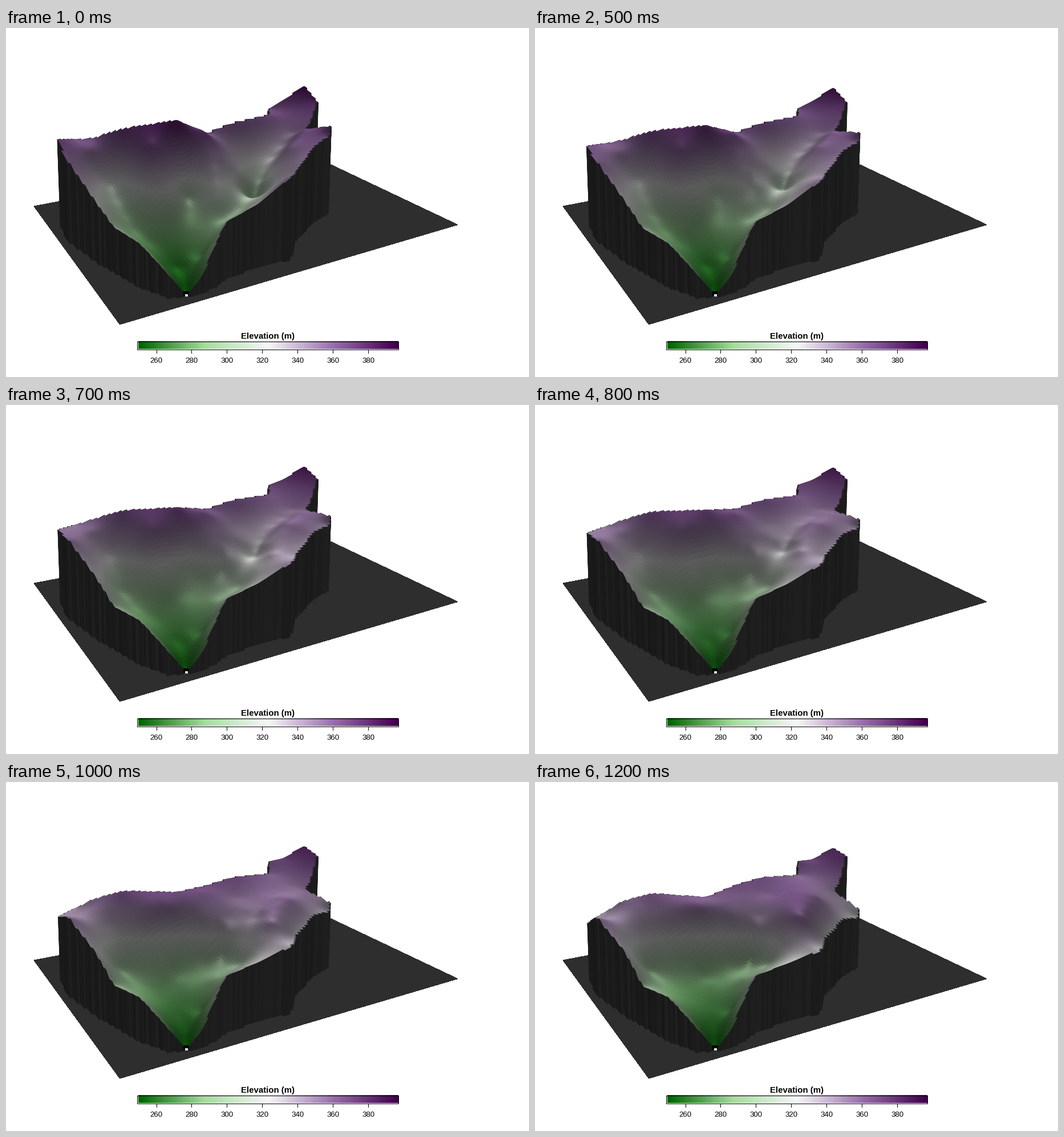
Write a matplotlib script that moves like this. It is 917x611 px and loops after 1.7 s.

```python
import numpy as np
import matplotlib.pyplot as plt
from matplotlib.animation import FuncAnimation
from matplotlib.collections import PolyCollection
from matplotlib.colors import LinearSegmentedColormap
from matplotlib.patches import Polygon, Rectangle
from matplotlib.path import Path

WIDTH, HEIGHT, DPI = 917, 611, 64
PT = 72 / DPI
NU, NV = 150, 86
ASPECT = 1.75
LOW, HIGH = 250, 397
HOLD, STEPS, FRAMES = 3, 9, 17

# Base plate corners on screen and the vanishing point of the verticals
PLATE = np.array([(199.5, 519), (792, 344.5), (531, 221), (49, 312)])
VANISH, RISE = np.array([330, 7000, 1.0]), 0.000248

# Basin rim: plate x, plate y, top y at the start, top y at the end
RIM = np.array([
    (316, 471, 468, 468), (285, 473, 432, 432), (235, 455, 377, 377),
    (190, 428, 348, 357), (160, 412, 305, 297), (113, 376, 233, 237),
    (94, 349, 195, 248),
    (126, 333, 195, 228), (156, 331, 193, 209), (208, 331, 176, 195),
    (300, 331, 162, 202), (352, 312, 184, 180), (398, 297, 166, 167),
    (459, 277, 152, 163), (459, 262, 142, 139), (482, 257, 127, 136),
    (519, 248, 102, 116), (541, 266, 130, 130),
    (529, 297, 168, 180), (519, 303, 178, 190), (563, 320, 172, 222),
    (563, 326, 188, 238), (537, 341, 207, 240), (503, 378, 254, 278),
    (498, 406, 260, 296), (440, 419, 308, 318), (385, 440, 340, 340),
    (364, 455, 385, 385), (345, 464, 432, 432)], float)

# Valley and ridge lines: screen x, screen y, elevation in metres
OUTLET = [[(316, 455, 254), (325, 380, 274)],
          [(345, 400, 272), (365, 345, 292), (410, 318, 303)]]
START = [[(325, 380, 274), (318, 295, 305), (320, 235, 342)],
         [(300, 420, 258), (225, 355, 285), (183, 272, 320), (150, 215, 356)],
         [(285, 340, 290), (268, 270, 332), (258, 205, 368)],
         [(372, 300, 312), (365, 225, 348)],
         [(430, 278, 304), (400, 243, 330), (345, 180, 372)],
         [(435, 305, 290), (455, 248, 318), (505, 185, 350)],
         [(450, 272, 312), (495, 210, 352), (520, 180, 362)]]
END = [[(325, 380, 274), (300, 340, 284)],
       [(200, 330, 295), (270, 314, 298), (380, 305, 300)],
       [(185, 275, 325), (265, 285, 315), (340, 265, 326), (410, 270, 328)],
       [(165, 240, 343), (250, 252, 336), (390, 235, 344)],
       [(180, 222, 350), (290, 220, 354), (465, 185, 358)],
       [(440, 275, 333), (467, 235, 356), (490, 200, 358)]]

PALETTE = LinearSegmentedColormap.from_list(
    "elevation", ["#006400", "#a6dba0", "#f7f7f7", "#9970ab", "#40004b"])


def camera():
    """Matrix from (u, v, z, 1) to homogeneous screen coordinates."""
    front, right, back, left = PLATE
    g, h = np.linalg.solve(np.column_stack([right - back, left - back]),
                           front - right + back - left)
    m = np.zeros((3, 4))
    m[:, 0] = *(right * (1 + g) - front), g
    m[:, 1] = *(left * (1 + h) - front), h
    m[:, 2] = -RISE * VANISH
    m[:, 3] = *front, 1
    return m


CAM = camera()


def project(u, v, z):
    p = np.stack([u, v, z, np.ones_like(u)], axis=-1) @ CAM.T
    return p[..., :2] / p[..., 2:]


def locate(x, y, z=0.0):
    """Plate position (u, v) of a point seen at (x, y) with height z."""
    xy = np.array([x, y])
    a = CAM[:2, :2] - np.outer(xy, CAM[2, :2])
    b = xy * (CAM[2, 2] * z + CAM[2, 3]) - (CAM[:2, 2] * z + CAM[:2, 3])
    return np.linalg.solve(a, b)


def height_at(uv, y):
    """Height that puts the point above (u, v) at screen row y."""
    _, row, w = CAM[:, :2] @ uv + CAM[:, 3]
    return (y * w - row) / (CAM[1, 2] - y * CAM[2, 2])


def refine(points, parts):
    """Evenly spaced points along each stretch of a line."""
    points = np.asarray(points, float)
    t = np.linspace(0, len(points) - 1, (len(points) - 1) * parts + 1)
    return np.column_stack([np.interp(t, np.arange(len(points)), c)
                            for c in points.T])


def kernel(p, q):
    d = (p[:, None] - q[None]) * (ASPECT, 1)
    return -np.sqrt((d ** 2).sum(-1) + 0.02 ** 2)


def surface(sites, heights, where):
    n = len(sites)
    a = np.ones((n + 1, n + 1))
    a[:n, :n] = kernel(sites, sites) + 0.003 * np.eye(n)
    a[n, n] = 0
    w = np.linalg.solve(a, np.append(heights, 0))
    return np.clip(kernel(where, sites) @ w[:n] + w[n], 0, 150)


U, V = np.meshgrid(np.linspace(0, 1, NU + 1), np.linspace(0, 1, NV + 1),
                   indexing="ij")
nodes = np.column_stack([U.ravel(), V.ravel()])
rim = refine(np.vstack([RIM, RIM[:1]]), 4)[:-1]
rim_uv = np.array([locate(x, y) for x, y, _, _ in rim])


def terrain(lines, column):
    spots = np.vstack([refine(line, 3) for line in lines])
    spots[:, 2] -= LOW
    inner = [locate(*s) for s in spots]
    edge = [height_at(uv, y) for uv, y in zip(rim_uv, rim[:, column])]
    return surface(np.vstack([rim_uv, inner]),
                   np.append(edge, spots[:, 2]), nodes).reshape(U.shape)


Z_START = terrain(OUTLET + START, 2)
Z_END = terrain(OUTLET + END, 3)

# Cells inside the rim
centers = np.column_stack([((U[:-1, :-1] + U[1:, 1:]) / 2).ravel(),
                           ((V[:-1, :-1] + V[1:, 1:]) / 2).ravel()])
inside = Path(rim_uv).contains_points(centers).reshape(NU, NV)
ci, cj = np.nonzero(inside)
corner_i = np.stack([ci, ci + 1, ci + 1, ci], axis=1)
corner_j = np.stack([cj, cj, cj + 1, cj + 1], axis=1)

# Wall pieces where a cell meets the outside: end nodes of each edge
padded = np.pad(inside, 1)
edges = []
for di, dj, a, b in [(-1, 0, (0, 0), (0, 1)), (1, 0, (1, 0), (1, 1)),
                     (0, -1, (0, 0), (1, 0)), (0, 1, (0, 1), (1, 1))]:
    free = inside & ~padded[1 + di:1 + di + NU, 1 + dj:1 + dj + NV]
    for i, j in zip(*np.nonzero(free)):
        edges.append((i + a[0], j + a[1], i + b[0], j + b[1]))
edges = np.array(edges)
wall_i, wall_j = edges[:, [0, 2, 2, 0]], edges[:, [1, 3, 3, 1]]
along_u = edges[:, 0] != edges[:, 2]
rng = np.random.default_rng(4)
tone = (np.where(along_u, 28, 24) + rng.uniform(-2, 3, len(edges))) / 255
wall_color = np.repeat(tone[:, None], 3, axis=1)


def depth(i, j):
    return (CAM[2, 0] * U[i, j] + CAM[2, 1] * V[i, j]).mean(axis=1)


# Painter's order, far to near
far = np.concatenate([depth(corner_i, corner_j), depth(wall_i, wall_j)])
order = np.argsort(-far, kind="stable")

TURN = np.radians(24.7)
LIGHT = np.array([0.05, 0.25, 1]) / np.linalg.norm([0.05, 0.25, 1])


def cell_colors(z):
    q = z[corner_i, corner_j]
    scale = 2.16 / 886
    su = (q[:, 1] + q[:, 2] - q[:, 0] - q[:, 3]) / 2 * NU * scale
    sv = (q[:, 2] + q[:, 3] - q[:, 0] - q[:, 1]) / 2 * NV * scale * ASPECT
    gx = su * np.cos(TURN) - sv * np.sin(TURN)
    gy = su * np.sin(TURN) + sv * np.cos(TURN)
    n = np.stack([-gx, -gy, np.ones_like(gx)], axis=1)
    n /= np.linalg.norm(n, axis=1, keepdims=True)
    shade = 0.36 + 0.5 * np.clip(n @ LIGHT, 0, 1) ** 3
    return PALETTE(q.mean(1) / (HIGH - LOW))[:, :3] * shade[:, None]


def build(t):
    z = Z_START + (Z_END - Z_START) * t
    cells = project(U[corner_i, corner_j], V[corner_i, corner_j],
                    z[corner_i, corner_j])
    wz = z[wall_i, wall_j]
    wz[:, 2:] = 0
    walls = project(U[wall_i, wall_j], V[wall_i, wall_j], wz)
    verts = np.concatenate([cells, walls])[order]
    colors = np.concatenate([cell_colors(z), wall_color])[order]
    return verts, colors


fig = plt.figure(figsize=(WIDTH / DPI, HEIGHT / DPI), dpi=DPI,
                 facecolor="white")
ax = fig.add_axes([0, 0, 1, 1])
ax.axis("off")

# Colour bar
ax.imshow(np.linspace(0, 1, 148)[None], cmap=PALETTE, aspect="auto",
          extent=(232, 688, 562, 548), interpolation="nearest", zorder=3)
ax.add_patch(Rectangle((229.5, 548.5), 458, 14, fill=False, ec="black",
                       lw=PT, zorder=4))
ax.text(459, 544, "Elevation (m)", family="Liberation Sans", weight="bold",
        size=15 * PT, ha="center", va="baseline")
for k in range(260, 381, 20):
    x = 263.5 + (k - 260) * 3.096
    ax.plot([x, x], [562.5, 568.5], color="black", lw=PT)
    ax.text(x, 586, str(k), family="Liberation Sans", size=13.3 * PT,
            ha="center", va="baseline")

ax.add_patch(Polygon(PLATE, fc="#2e2e2e", ec="none", antialiased=False,
                     zorder=1))
relief = PolyCollection([], linewidths=0.5 * PT, zorder=2)
ax.add_collection(relief, autolim=False)

# Outlet marker
ax.add_patch(Rectangle((311, 461), 9, 8, fc="black", zorder=2.5))
ax.add_patch(Rectangle((314, 466), 5, 4, fc="#e6e6e0", zorder=2.6))
ax.set_xlim(0, WIDTH)
ax.set_ylim(HEIGHT, 0)


def update(frame):
    verts, colors = build(np.clip(frame - HOLD, 0, STEPS) / STEPS)
    relief.set_verts(verts)
    relief.set_facecolor(colors)
    relief.set_edgecolor(colors)
    return [relief]


anim = FuncAnimation(fig, update, frames=FRAMES, interval=100, repeat=True,
                     repeat_delay=0, blit=False)
plt.show()
```
